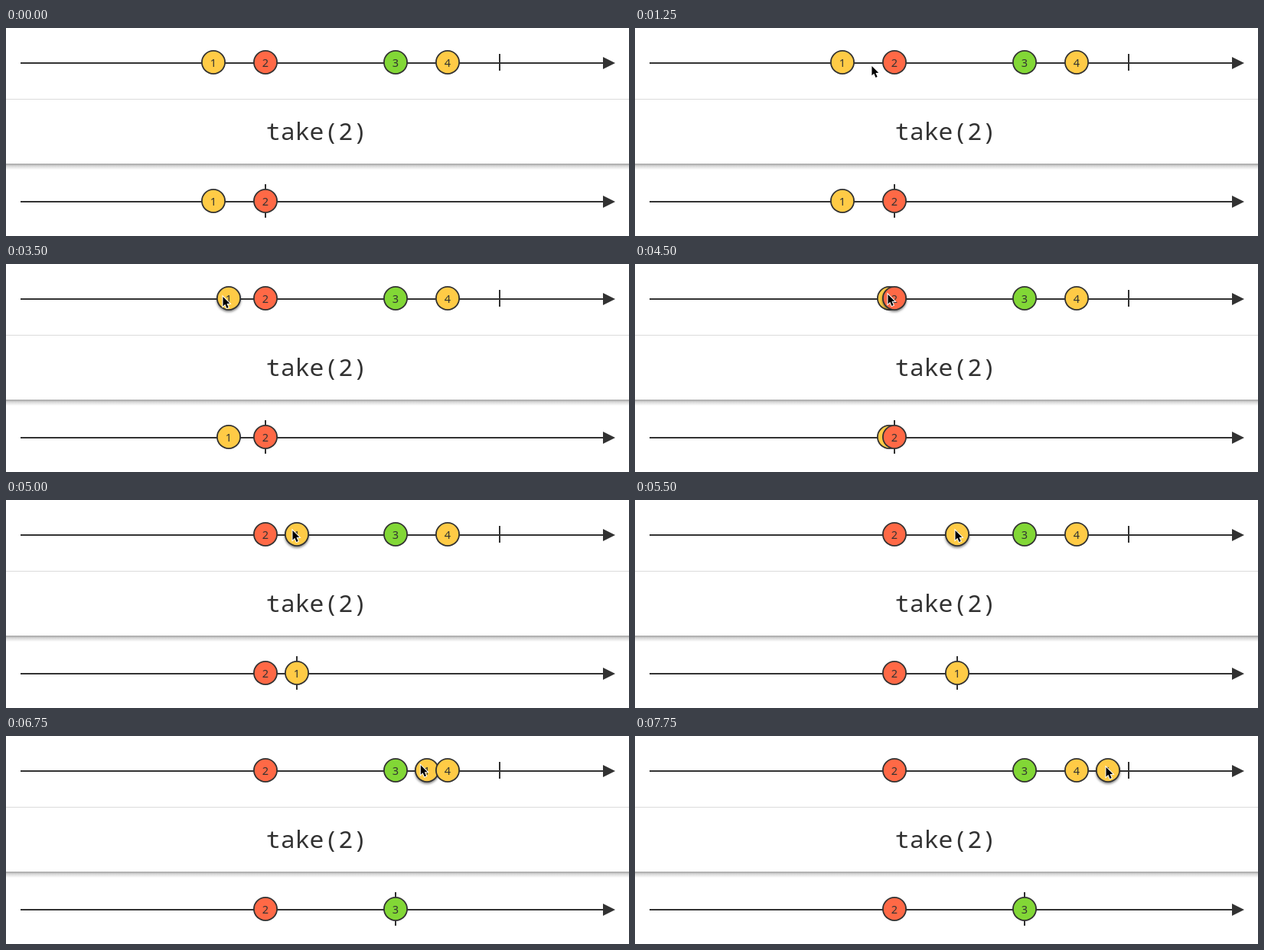
Write an HTML page with a canvas that moves like this. It is 814 by 273 pixels and loops after 8000 ms.

```html
<!DOCTYPE html>
<html>
<head>
<meta charset="utf-8">
<style>
  html, body { margin: 0; width: 100%; height: 100%; overflow: hidden; background: #fff; }
  canvas { display: block; }
</style>
</head>
<body>
<canvas id="stage" width="814" height="273"></canvas>
<script>
const ctx = document.getElementById('stage').getContext('2d');
const LOOP = 8000, STEP = 250, SHOW = 750, REST = 2000, GRAB = 2750;
const INK = '#323232', YELLOW = '#ffcb46', RED = '#ff6946', GREEN = '#82d736';

// key points of the drag
const DRAG = [
  { t: 3250, x: 263, y: 42 }, { t: 3500, x: 283, y: 42 }, { t: 4500, x: 330, y: 39 },
  { t: 5500, x: 418, y: 39 }, { t: 7000, x: 566, y: 37 }, { t: 7750, x: 615, y: 40 }
];

// marbles sit on whole units of the time axis
const toX = at => Math.round(67 + 6.8 * at);
const toUnit = x => Math.round((x - 61.8) / 6.8);
const clamp = k => Math.min(1, Math.max(0, k));
const mix = (a, b, k) => a + (b - a) * k;
const easeOut = (k, power) => 1 - (1 - k) ** power;

function pointerAt(t) {
  if (t < GRAB) {
    const k = clamp((t - SHOW) / (REST - SHOW));
    return { x: mix(359, 261, easeOut(k, 1.4)), y: mix(28, 50, easeOut(k, 6)) };
  }
  const i = Math.max(1, DRAG.findIndex(p => p.t >= t));
  const a = DRAG[i - 1], b = DRAG[i];
  const k = clamp((t - a.t) / (b.t - a.t));
  return { x: mix(a.x, b.x, k), y: mix(a.y, b.y, k) };
}

function rect(color, x, y, w, h) {
  ctx.fillStyle = color;
  ctx.fillRect(x, y, w, h);
}

function poly(points) {
  ctx.beginPath();
  points.forEach(p => ctx.lineTo(...p));
  ctx.closePath();
}

function text(str, x, y, font) {
  ctx.font = font;
  ctx.textAlign = 'center';
  ctx.fillStyle = INK;
  ctx.fillText(str, x, y);
}

function axis(y) {
  rect(INK, 19, y - 1, 762, 2);
  poly([[780, y - 8], [796, y], [780, y + 8]]);
  ctx.fill();
}

function disc(x, y, r, color) {
  ctx.beginPath();
  ctx.arc(x, y, r, 0, 2 * Math.PI);
  ctx.fillStyle = color;
  ctx.fill();
}

function marble({ label, color, at }, y, lifted) {
  const x = toX(at);
  ctx.save();
  if (lifted) {
    ctx.shadowColor = 'rgba(0,0,0,.45)';
    ctx.shadowBlur = 3;
    ctx.shadowOffsetY = 2;
  }
  disc(x, y, 16, INK);
  ctx.restore();
  disc(x, y, 14.2, color);
  text(label, x, y + 5.5, '14.5px "Noto Sans", sans-serif');
}

function panel() {
  rect('#dcdcdc', 0, 93, 814, 1);
  const shade = ctx.createLinearGradient(0, 178, 0, 186);
  shade.addColorStop(0, '#a0a0a0');
  shade.addColorStop(0.4, '#d8d8d8');
  shade.addColorStop(1, '#fff');
  rect(shade, 0, 178, 814, 8);
  text('take(2)', 406, 147, '31.5px "Noto Sans Mono", monospace');
}

function arrow({ x, y }) {
  ctx.save();
  ctx.translate(x + 0.5, y + 1);
  poly([[0, 0], [0, 12.4], [2.8, 9.8], [5, 15], [7.2, 14], [5, 9], [8.8, 8.8]]);
  ctx.lineWidth = 2;
  ctx.strokeStyle = '#fff';
  ctx.stroke();
  ctx.fillStyle = '#000';
  ctx.fill();
  ctx.restore();
}

function draw(t) {
  const pointer = pointerAt(t);
  const dragging = t >= GRAB;
  const marbles = [
    { label: '1', color: YELLOW, at: dragging ? toUnit(pointer.x) : 30 },
    { label: '2', color: RED, at: 40 },
    { label: '3', color: GREEN, at: 65 },
    { label: '4', color: YELLOW, at: 75 }
  ].sort((a, b) => a.at - b.at);
  const under = marbles.filter(m => Math.hypot(toX(m.at) - pointer.x, 45 - pointer.y) < 16);
  const lifted = dragging && under.pop();
  const taken = marbles.slice(0, 2);

  rect('#fff', 0, 0, 814, 273);
  panel();
  axis(46);
  rect(INK, 644, 34, 2, 22);
  marbles.forEach(m => marble(m, 45, m === lifted));
  axis(228);
  rect(INK, toX(taken[1].at) - 1, 205, 2, 44);
  taken.forEach(m => marble(m, 227));
  if (t >= SHOW) arrow(pointer);
}

function tick(now) {
  draw(Math.floor(now % LOOP / STEP) * STEP);
  requestAnimationFrame(tick);
}
requestAnimationFrame(tick);
</script>
</body>
</html>
```
